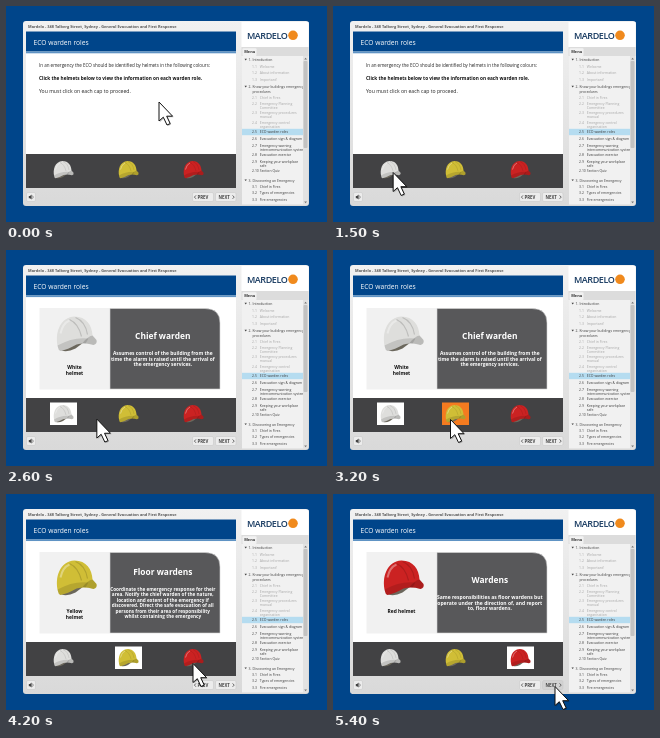
Animation, 321 px wide and 216 px high, one loop 5.6 s. Source, as an HTML page:

```html
<!DOCTYPE html>
<html lang="en">
<head>
<meta charset="utf-8">
<title>ECO warden roles</title>
<style>
html, body { margin: 0; width: 100%; height: 100%; overflow: hidden; background: #00458a; }
svg { display: block; width: 100vw; height: 100vh; font-family: "Open Sans", sans-serif; }
</style>
</head>
<body>
<svg viewBox="0 0 321 216">
  <defs>
    <linearGradient id="bar" x2="0" y2="1">
      <stop offset="0" stop-color="#f1f1f1"/><stop offset="1" stop-color="#d9d9d9"/>
    </linearGradient>
    <g id="helmet">
      <path d="M4 29L6 34Q12 36 20 32L28 26Z" fill="#6b675c"/>
      <path d="M2.5 31C-1 17 4 1 19 0C31 0 36.5 9 37 19L41 23.5Q42 27.5 38 28.5Q29 26 21 28Q12 33 5 34.5Q3 34 2.5 31Z"/>
      <path d="M27 26.5Q32 20 37 19L41 23.5Q42 27.5 38 28.5Q32 27 27 26.5Z" fill="#000" fill-opacity=".16"/>
      <path d="M2.5 31Q3 34 5 34.5Q12 33 21 28Q26 26.5 30 27L33 22Q18 20 2 29Z" fill="#000" fill-opacity=".12"/>
      <path d="M14 3Q23 7 26 20M20 1Q30 5 32 18" fill="none" stroke="#000" stroke-opacity=".15" stroke-width="1.2"/>
      <path d="M5 17Q7 7 14 4" fill="none" stroke="#fff" stroke-opacity=".35" stroke-width="2"/>
    </g>
  </defs>
  <rect width="321" height="216" fill="#00458a"/>

  <rect x="17" y="15" width="286" height="185" rx="3" fill="url(#bar)"/>
  <text x="22" y="21.8" font-size="3.9" font-weight="700" fill="#555">Mardelo - 348 Talberg Street, Sydney - General Evacuation and First Response</text>
  <rect x="20" y="25.5" width="210" height="156.5" fill="#fff"/>
  <rect x="20" y="25.5" width="210" height="20" fill="#00458a"/>
  <rect x="20" y="45.5" width="210" height="1.8" fill="#5f93c4"/>
  <text x="27.5" y="38.8" font-size="6.7" fill="#fff">ECO warden roles</text>
  <rect x="20" y="148" width="210" height="34" fill="#424244"/>

  <g id="intro" fill="#222">
    <text x="33" y="60.6" font-size="4.5">In an emergency the ECO should be identified by helmets in the following colours:</text>
    <text x="33" y="73.6" font-size="4.72" font-weight="700" fill="#111">Click the helmets below to view the information on each warden role.</text>
    <text x="33" y="87" font-size="5.1">You must click on each cap to proceed.</text>
  </g>
  <g id="panels"></g>
  <g id="caps"></g>

  <g fill="#ececec" stroke="#c4c4c4" stroke-width=".5">
    <rect x="20.5" y="186.5" width="9" height="9" rx="1.5"/>
    <rect x="186.5" y="186.5" width="21" height="9" rx="1.5"/>
    <rect id="next" x="209.5" y="186.5" width="20.5" height="9" rx="1.5"/>
  </g>
  <path d="M22.8 190h1.2l1.6-1.4v5l-1.6-1.4h-1.2z" fill="#444"/>
  <path d="M26.5 189.6q1.4 1.5 0 3" fill="none" stroke="#444" stroke-width=".6"/>
  <g font-size="4.3" font-weight="700" fill="#444">
    <text x="191.5" y="192.7">PREV</text><text x="212.5" y="192.7">NEXT</text>
  </g>
  <path d="M190 189.4l-1.6 1.7 1.6 1.7M226.6 189.4l1.6 1.7-1.6 1.7" fill="none" stroke="#444" stroke-width=".8"/>

  <rect x="235.5" y="16" width="67" height="25" fill="#fff"/>
  <text x="241" y="32.8" font-size="9" font-weight="600" fill="#15385f" letter-spacing="-.45">MARDELO</text>
  <circle cx="287" cy="29.3" r="4.8" fill="#f08a1d"/>
  <rect x="235.5" y="41" width="67" height="9" fill="#dcdcdc"/>
  <rect x="236.5" y="42.3" width="14" height="7.7" rx="1" fill="#f1f1f1"/>
  <text x="238.2" y="47.3" font-size="3.9" font-weight="700" fill="#333">Menu</text>
  <rect x="236" y="50" width="66" height="148.5" fill="#f1f1f1"/>
  <rect x="236" y="122.8" width="61" height="6.4" fill="#b5dcf0"/>
  <g id="menu" font-size="3.45"></g>
  <rect x="297" y="50" width="5" height="148.5" fill="#e2e2e2"/>
  <rect x="297.5" y="55" width="4" height="87" rx="1" fill="#c2c2c2"/>
  <path d="M298.2 53.4l1.4-1.6 1.4 1.6zM298.2 195.6l1.4 1.6 1.4-1.6z" fill="#777"/>

  <g id="cursor">
    <path d="M0 0V19L4.3 15.2L8 23L11.2 21.6L7.7 14.2H13.6Z" transform="translate(1 1)" fill="#000" fill-opacity=".25"/>
    <path d="M0 0V19L4.3 15.2L8 23L11.2 21.6L7.7 14.2H13.6Z" fill="#fff" stroke="#111" stroke-width="1" stroke-linejoin="round"/>
  </g>
</svg>
<script>
const $ = id => document.getElementById(id);
const LOOP = 5600, STEP = 100;

// [baseline, number, text, colour]; rows without a number continue the one above
const dim = '#a5a5a5', ink = '#3c3c3c';
const menu = [
  [55, '1.', 'Introduction', ink],
  [61.5, '1.1', 'Welcome', dim],
  [68, '1.2', 'About information', dim],
  [74.5, '1.3', 'Important!', dim],
  [82, '2.', 'Know your buildings emergency', ink],
  [86.5, '', 'procedures', ink],
  [92.5, '2.1', 'Chief in Fires', dim],
  [98.7, '2.2', 'Emergency Planning', dim],
  [102.7, '', 'Committee', dim],
  [108.3, '2.3', 'Emergency procedures', dim],
  [112.3, '', 'manual', dim],
  [117.8, '2.4', 'Emergency control', dim],
  [121.6, '', 'organisation', dim],
  [127.4, '2.5', 'ECO warden roles', ink],
  [134.3, '2.6', 'Evacuation sign & diagram', ink],
  [140.7, '2.7', 'Emergency warning', ink],
  [144.7, '', 'intercommunication system', ink],
  [150.4, '2.8', 'Evacuation exercise', ink],
  [156.6, '2.9', 'Keeping your workplace', ink],
  [160.6, '', 'safe', ink],
  [166.2, '2.10', 'Section Quiz', ink],
  [175.6, '3.', 'Discovering an Emergency', ink],
  [182, '3.1', 'Chief in Fires', ink],
  [188.2, '3.2', 'Types of emergencies', ink],
  [194.6, '3.3', 'Fire emergencies', ink]
];
$('menu').innerHTML = menu.map(([y, no, label, fill]) => {
  const head = no.endsWith('.');
  const x = head || label === 'procedures' ? 246.5 : 253.8;
  return `<g fill="${fill}">` +
    (head ? `<path d="M238.5 ${y - 2.2}h2.4l-1.2 1.7z"/>` : '') +
    `<text x="${head ? 242.5 : 246}" y="${y}">${no}</text>` +
    `<text x="${x}" y="${y}">${label.replace('&', '&amp;')}</text></g>`;
}).join('');

const wardens = [
  { x: 57, fill: '#dededc', name: ['White', 'helmet'], title: 'Chief warden', top: 89, size: 4.9,
    lines: ['Assumes control of the building from the', 'time the alarm is raised until the arrival of',
      'the emergency services.'], hover: 1600, click: 2200 },
  { x: 122, fill: '#d0be36', name: ['Yellow', 'helmet'], title: 'Floor wardens', top: 80.5, size: 4.7,
    lines: ['Coordinate the emergency response for their', 'area. Notify the chief warden of the nature,',
      'location and extent of the emergency if', 'discovered. Direct the safe evacuation of all',
      'persons from their area of responsibility', 'whilst containing the emergency'],
    hover: 3000, click: 3600 },
  { x: 187, fill: '#cb2222', name: ['Red helmet'], title: 'Wardens', top: 89, size: 5,
    lines: ['Same responsibilities as floor wardens but', 'operate under the direction of, and report',
      'to, floor wardens.'], hover: 4300, click: 4900 }
];

const rows = (list, x, y, gap) =>
  list.map((s, i) => `<text x="${x}" y="${y + i * gap}">${s}</text>`).join('');

$('panels').innerHTML = wardens.map((w, i) => `
  <g id="panel${i}" text-anchor="middle" font-weight="700">
    <rect x="20" y="47.3" width="210" height="100.7" fill="#fff"/>
    <rect x="33.5" y="58" width="70.5" height="81.5" fill="#f1f1f1"/>
    <path d="M104 58.5H199Q214 58.5 214 73V139H104Z" fill="#58585a" stroke="#d5d5d5" stroke-width=".6"/>
    <use href="#helmet" x="49.5" y="66.5" fill="${w.fill}"/>
    <g font-size="4.9" fill="#111">${rows(w.name, 68.5, 119.3, 6)}</g>
    <g fill="#fff">
      <text x="156.8" y="${w.top}" font-size="8.4">${w.title}</text>
      <g font-size="${w.size}">${rows(w.lines, 156.8, w.top + 16.2, 5.55)}</g>
    </g>
  </g>`).join('');

$('caps').innerHTML = wardens.map((w, i) => `
  <rect id="box${i}" x="${w.x - 13}" y="152.5" width="27" height="22.5"/>
  <use href="#helmet" transform="translate(${w.x - 10} 155) scale(.5)" fill="${w.fill}"/>`).join('');

const clamp = u => Math.min(1, Math.max(0, u));
const easeOut = u => 1 - (1 - u) ** 2;

// [start, duration, x, y]
const moves = [[1000, 600, 57.5, 168.5], [2400, 600, 117.5, 169.5], [3700, 600, 189, 169.5], [5000, 400, 222, 192.5]];

function cursorAt(t) {
  let x = 153, y = 96;
  for (const [start, time, tx, ty] of moves) {
    const k = easeOut(clamp((t - start) / time));
    x += (tx - x) * k;
    y += (ty - y) * k;
  }
  return [x, y];
}

function draw(t) {
  const [x, y] = cursorAt(t);
  const chosen = wardens.filter(w => t >= w.click).length - 1;
  $('cursor').setAttribute('transform', `translate(${x} ${y})`);
  wardens.forEach((w, i) => {
    const glow = i > chosen ? clamp((t - w.hover) / 200) : 0;
    $('panel' + i).setAttribute('opacity', clamp((t - w.click + 200) / 200));
    $('box' + i).setAttribute('fill', i === chosen ? '#fff' : '#f47b20');
    $('box' + i).setAttribute('opacity', i === chosen ? 1 : glow);
  });
  $('intro').setAttribute('opacity', chosen < 0 ? 1 : 0);
  $('next').setAttribute('fill', t >= 5400 ? '#d2d2d2' : '#ececec');
}

const begin = performance.now();
function tick() {
  const t = (performance.now() - begin) % LOOP;
  draw(Math.floor(t / STEP) * STEP);
  requestAnimationFrame(tick);
}
tick();
</script>
</body>
</html>
```
